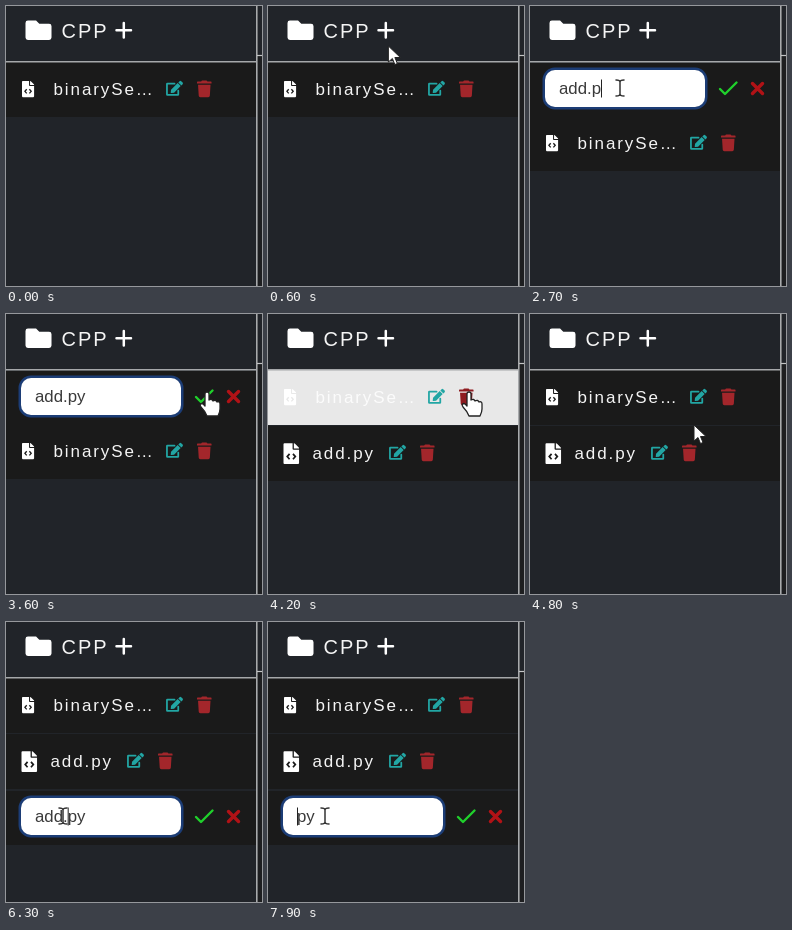
Write an HTML page that moves like this. It is 256 px wide and 280 px high and loops after 8000 ms.

```html
<!DOCTYPE html>
<html lang="en">
<head>
<meta charset="utf-8">
<title>File list</title>
<style>
  html, body { margin: 0; width: 100%; height: 100%; overflow: hidden; background: #212429; }
  svg { display: block; width: 256px; height: 280px; }
  text { font-family: "Liberation Sans", Arial, sans-serif; font-size: 17px; }
  .name { fill: #f4f4f4; letter-spacing: 1.9px; }
  .row { --bg: #1a1a1a; --bin: #a3262b; }
  .row.hot { --bg: #e8e8e8; --bin: #8f1c21; }
  .row.hot .name { fill: #fbfbfb; }
  .band { fill: var(--bg); }
  .file { fill: #fff; }
  .code { fill: none; stroke: var(--bg); stroke-width: 42; }
  .edit { fill: #22a6a4; }
  .edit .box { fill: none; stroke: #22a6a4; stroke-width: 60; stroke-linecap: round; stroke-linejoin: round; }
  .bin { fill: var(--bin); }
  .field { fill: #e8e8e8; }
  .ring { fill: none; stroke: #1d4486; stroke-width: 3; opacity: 0; }
  .focus .field { fill: #fff; }
  .focus .ring { opacity: .85; }
  #value { font-size: 16.8px; fill: #3a3a3a; }
  #value.hint { fill: #7b7b7b; }
  .line { fill: none; stroke-linecap: round; stroke-linejoin: round; }
</style>
</head>
<body>
<svg viewBox="0 0 256 280">
  <defs>
    <g id="file">
      <path class="file" d="M224 136V0H24Q0 0 0 24V488Q0 512 24 512H360Q384 512 384 488V160H248Q224 160 224 136ZM384 128H256V0Q270 0 279 7L377 105Q384 112 384 128Z"/>
      <path class="code" d="M150 262L92 328L150 394M234 262L292 328L234 394"/>
    </g>
    <g id="edit" class="edit">
      <path class="box" d="M290 96H48Q32 96 32 112V464Q32 480 48 480H400Q416 480 416 464V330"/>
      <path d="M396 78L498 180L274 406L182 416Q158 416 160 394L171 302ZM418 54L460 12Q488 -12 516 12L564 60Q588 88 564 116L522 158Z"/>
    </g>
    <path id="bin" class="bin" d="M0 52Q0 32 18 32H128L144 8Q150 0 162 0H286Q298 0 304 8L320 32H430Q448 32 448 52V96H0ZM32 128H416L395 467Q391 512 347 512H101Q57 512 53 467Z"/>
  </defs>

  <path fill="#1d1e20" d="M252 50H256V280H252Z"/>
  <path fill="#fff" transform="translate(19.5 11.3) scale(.0508)" d="M464 128H272L208 64H48Q0 64 0 112V400Q0 448 48 448H464Q512 448 512 400V176Q512 128 464 128Z"/>
  <text x="55.5" y="32" fill="#f4f4f4" style="font-size:20px;letter-spacing:2px">CPP</text>
  <path class="line" stroke="#fff" stroke-width="2.5" d="M110.5 24.3H125M117.8 17V31.6"/>

  <g id="rows"></g>
  <g id="form">
    <rect y="57" width="250" height="54" fill="#1a1a1a"/>
    <rect class="ring" x="14" y="63" width="162" height="39" rx="11"/>
    <rect class="field" x="15" y="64" width="160" height="37" rx="10"/>
    <text id="value" x="29" y="88"></text>
    <path id="caret" stroke="#222" d="M0 73.5V91.5"/>
    <path class="line" stroke="#20d02c" stroke-width="2.4" d="M190 83L195 88L206.5 76.5"/>
    <path class="line" stroke="#b11216" stroke-width="3.4" d="M222.5 77.5L232.5 87.5M232.5 77.5L222.5 87.5"/>
  </g>

  <path stroke="#a6a8aa" stroke-width="1.5" d="M0 55.7H250"/>
  <path stroke="#b0b2b3" stroke-width="1.5" d="M250.8 0V280"/>
  <path stroke="#c4c5c6" stroke-width="1.2" d="M251 49.5H256"/>

  <g id="pointer">
    <path id="beam" class="line" stroke="#333" stroke-width="1.5" d="M-4 -8Q0 -8 0 -6Q0 -8 4 -8M0 -6V6M-4 8Q0 8 0 6Q0 8 4 8"/>
    <path id="hand" fill="#fff" stroke="#222" stroke-width="1.3" stroke-linejoin="round" d="M-2 10V1Q-2 -1 0 -1T2 1V7Q5 5.500 6 8Q9 6.500 10 9Q13 8 13 11V16Q13 19 11 23H0Q-2 18 -6 14Q-8 11 -5 10.500Q-4 10.500 -2 13Z"/>
    <path id="arrow" fill="#fff" stroke="#222" d="M0 0V16L4 12.500L6.500 18.500L9 17.500L6.500 11.500H12Z"/>
  </g>
</svg>
<script>
const LOOP = 8000, STEP = 100;
const $ = id => document.getElementById(id);
const show = (el, on) => { el.style.display = on ? "" : "none"; };
const at = (el, x, y) => el.setAttribute("transform", `translate(${x} ${y})`);

// Row markup, drawn with its top edge at y = 0
const use = (id, x, y, scale) => `<use href="#${id}" transform="translate(${x} ${y}) scale(${scale})"/>`;
const row = (name, textX, icon, editX) => `<g class="row">
  <rect class="band" width="250" height="55"/>
  ${use("file", icon.x, icon.y, icon.scale)}
  <text class="name" x="${textX}" y="33">${name}</text>
  ${use("edit", editX, 18.8, .0295)}${use("bin", editX + 31, 18.5, .0325)}</g>`;
$("rows").innerHTML =
  row("binarySe…", 47.5, { x: 16, y: 19, scale: .0315 }, 160) +
  row("add.py", 44.5, { x: 15.5, y: 17.3, scale: .0405 }, 121);
const [first, second] = $("rows").children;

// Form states: time, text, caret index, focused
const edits = [
  [1100, "", 0, 0], [1300, "", 0, 1],
  [2000, "a", 1, 1], [2200, "ad", 2, 1], [2300, "add", 3, 1],
  [2500, "add.", 4, 1], [2600, "add.p", 5, 1], [2800, "add.py", 6, 1],
  [3800, null],
  [5200, "add.py", 6, 0], [5900, "add.py", 4, 1],
  [6900, "addpy", 3, 1], [7100, "adpy", 2, 1], [7300, "apy", 1, 1], [7600, "py", 0, 1]
];

// Pointer stops: time, x, y
const stops = [
  [100, 150, 240], [700, 118, 24], [1100, 118, 24], [1300, 90, 82],
  [2900, 90, 82], [3500, 201, 79], [4600, 201, 79], [5000, 127, 143],
  [5450, 127, 143], [5800, 57, 194], [LOOP, 57, 194]
];

function pointerAt(t) {
  const i = stops.findIndex(s => s[0] > t);
  const [t0, x0, y0] = stops[i - 1], [t1, x1, y1] = stops[i];
  const p = (t - t0) / (t1 - t0), e = p * p * (3 - 2 * p);
  return [x0 + (x1 - x0) * e, y0 + (y1 - y0) * e];
}

function draw(t) {
  const edit = edits.filter(e => e[0] <= t).pop();
  const open = !!edit && edit[1] !== null;
  const added = t >= 3800;
  const firstY = open && !added ? 110 : 56;
  const formY = added ? 112 : 0;

  at(first, 0, firstY);
  at(second, 0, 112);
  show(second, added);
  show($("form"), open);
  at($("form"), 0, formY);

  if (open) {
    const [since, text, index, focused] = edit, value = $("value");
    value.textContent = text || "File Name";
    value.classList.toggle("hint", !text);
    $("form").classList.toggle("focus", !!focused);
    const x = 29.5 + (index ? value.getSubStringLength(0, index) : 0);
    at($("caret"), x, 0);
    show($("caret"), focused && (t - since) % 1000 < 500);
  }

  const visible = t >= stops[0][0];
  const [x, y] = visible ? pointerAt(t) : [-50, -50];
  const within = (top, height) => y >= top && y < top + height;
  const hot1 = within(firstY, 55), hot2 = added && within(112, 55);
  first.classList.toggle("hot", hot1);
  second.classList.toggle("hot", hot2);

  const beam = open && x > 15 && x < 175 && within(formY + 64, 37);
  const onMark = open && x > 186 && within(formY + 70, 25);
  const onPlus = Math.abs(x - 118) < 9 && within(15, 18);
  const hand = !beam && (hot1 || hot2 || onMark || onPlus);
  show($("pointer"), visible);
  at($("pointer"), x, y);
  show($("beam"), beam);
  show($("hand"), hand);
  show($("arrow"), !beam && !hand);
}

let last = -1;
function tick(now) {
  const t = Math.floor(now % LOOP / STEP) * STEP;
  if (t !== last) draw(last = t);
  requestAnimationFrame(tick);
}
draw(0);
requestAnimationFrame(tick);
</script>
</body>
</html>
```
